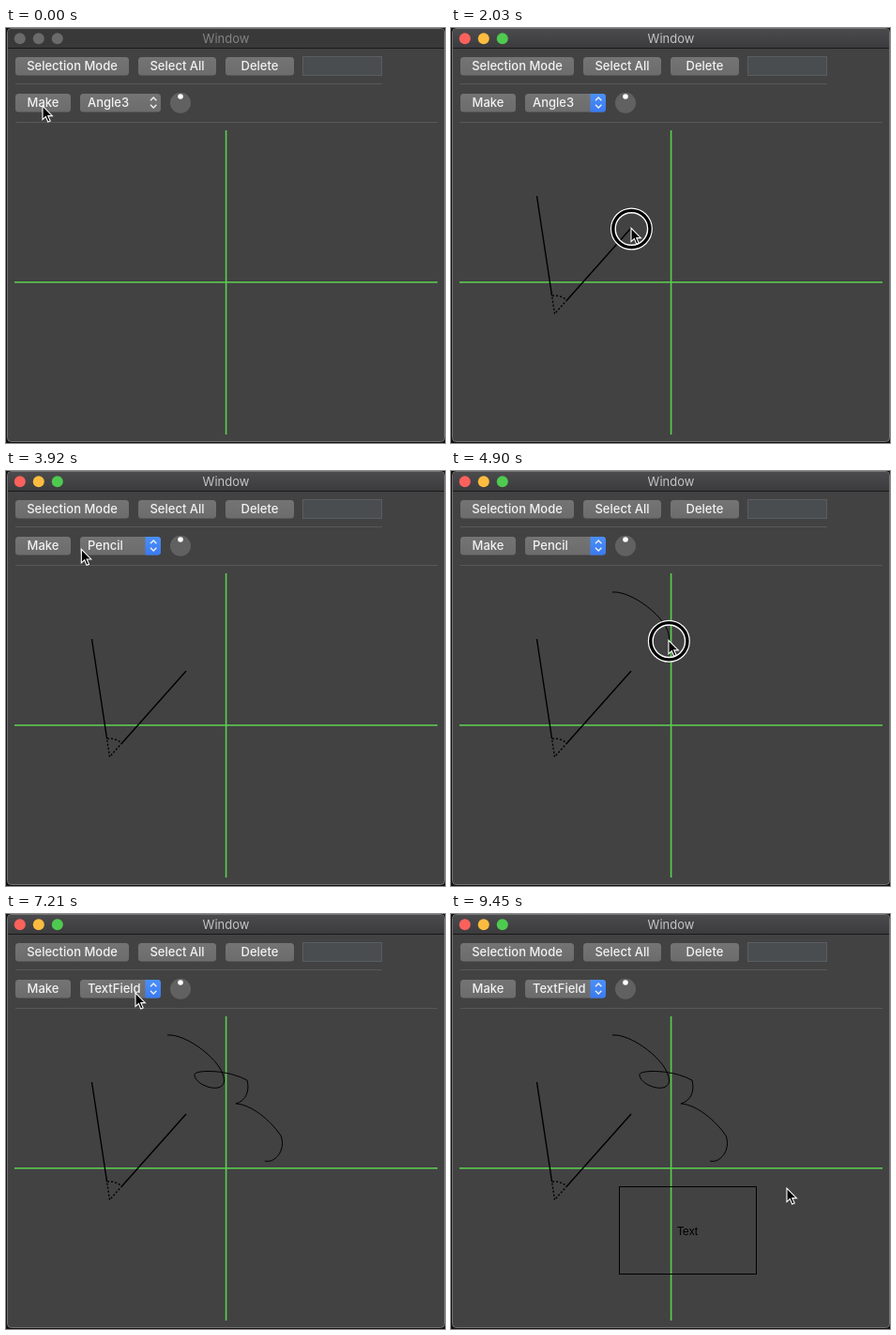
These frames come from a looping animation (468 px wide and 442 px high, 9.52 s). An HTML page:

```html
<!DOCTYPE html>
<html lang="en">
<head>
<meta charset="utf-8">
<title>Drawing window</title>
<style>
html, body { margin: 0; width: 100%; height: 100%; overflow: hidden; background: #111; }
svg { display: block; width: 468px; height: 442px; }
text { font: 500 13px Inter, "Open Sans", sans-serif; fill: #f2f2f2; }
.mid { text-anchor: middle; }
.ink { fill: none; stroke: #000; stroke-width: 1.4; }
.thin { stroke-width: 1; }
.dots { stroke-dasharray: 2 2; }
.rule { stroke: #58585a; }
.axis { stroke: #5bd04e; stroke-width: 1.6; }
</style>
</head>
<body>
<svg viewBox="0 0 468 442">
  <defs>
    <linearGradient id="bar" x2="0" y2="1"><stop stop-color="#4b4b4d"/><stop offset="1" stop-color="#3b3b3d"/></linearGradient>
    <linearGradient id="face" x2="0" y2="1"><stop stop-color="#747475"/><stop offset="1" stop-color="#6c6c6d"/></linearGradient>
    <linearGradient id="blue" x2="0" y2="1"><stop stop-color="#4b90f9"/><stop offset="1" stop-color="#3a7af1"/></linearGradient>
  </defs>
  <rect x="1.5" y=".5" width="466" height="440" rx="4" fill="#424243" stroke="#737374"/>
  <path id="titlebar" d="M2 21.5V5Q2 1 6 1H463Q467 1 467 5V21.5Z"/>
  <path d="M2 21.5H467" stroke="#19191a"/>
  <g id="lights"></g>
  <text id="title" class="mid" x="234.5" y="16" style="font-weight:400">Window</text>

  <g id="buttons"></g>
  <rect x="316.5" y="30.5" width="84" height="20" fill="#494d50" stroke="#5a5d60"/>
  <path class="rule" d="M10 59.5H401M10 100.5H460"/>
  <rect x="79" y="70" width="86" height="19.5" rx="3.5" fill="url(#face)"/>
  <path id="stepper" d="M148.5 70H161.5Q165 70 165 73.5V86Q165 89.5 161.5 89.5H148.5Z" fill="url(#blue)"/>
  <path d="M154 77.3L157.2 74 160.4 77.3M154 81.7L157.2 85 160.4 81.7" fill="none" stroke="#eee" stroke-width="1.4"/>
  <text id="tool" x="87" y="84"></text>
  <circle cx="186" cy="79.7" r="11" fill="#616162"/>
  <circle cx="186" cy="73" r="2.8" fill="#fff"/>

  <path class="axis" d="M234.6 109V433M9 270.8H460"/>
  <path id="arms" class="ink"/>
  <path id="wedge" class="ink dots"/>
  <path id="pencil" class="ink thin" d="M172 129C192 127 232 157 232.5 177C232.5 193 201 183 201 171C201 166 235 165 257 177C260 188 256 199 245 202C262 203 282 220 293 236C299 252 286 266 276 263"/>
  <g id="field">
    <rect id="frame" class="ink thin" x="179.5" y="290.5"/>
    <text id="label" class="mid" style="font:12px 'Liberation Sans',Arial,sans-serif;fill:#000">Text</text>
  </g>

  <g id="cursor">
    <g id="ring" fill="none" transform="translate(.4 1)">
      <circle r="19.5" stroke="#fff" stroke-width="6"/>
      <circle r="19.6" stroke="#000" stroke-width="3.4"/>
    </g>
    <path d="M0 0V14.5L3.4 11.4 5.7 17 8.2 16 5.8 10.6H10.4Z" stroke="#fff" stroke-width="1.1"/>
  </g>
</svg>
<script>
const LOOP = 9520, STEP = 70, CLICK = 280;
const $ = id => document.getElementById(id);
const set = (id, attrs) => { for (const k in attrs) $(id).setAttribute(k, attrs[k]); };
const show = (id, on) => { $(id).style.display = on ? '' : 'none'; };
const clamp = u => Math.min(1, Math.max(0, u));
const ease = u => u * u * (3 - 2 * u);

// The cursor arrives at a place, stays there, then glides to the next one.
const stops = [];
function visit(at, [x, y], stay = CLICK) {
  const stop = { at, x, y, leave: at + stay, press: at + STEP, release: at + Math.min(stay, CLICK) };
  stops.push(stop);
  return stop;
}
const makeButton = [49, 83], menu = [138, 84];
const makeAngle = visit(0, [39, 83]);
const vertex = visit(420, [110.5, 304.5]);
const endA = visit(840, [91.5, 179], 350);
const endB = visit(1890, [192, 213]);
const pickPencil = visit(2730, menu, 980);
const makePencil = visit(4060, makeButton);
const draw = visit(4620, [172, 129], 1050);
const pickField = visit(6510, menu, 700);
const makeField = visit(7700, makeButton);
const cornerA = visit(8400, [179, 290]);
const cornerB = visit(9030, [325, 383], 140);
visit(9450, [358, 292], 0);
draw.release = draw.leave - STEP;

const pressed = (stop, t) => t >= stop.press && t < stop.release;
const pencilLength = $('pencil').getTotalLength();
const drawnLength = t => pencilLength * clamp((t - draw.press) / (11 * STEP));

function buildControls() {
  const button = (name, x, y, w) =>
    `<rect id="${name}" x="${x}" y="${y}" width="${w}" height="19.5" rx="3.5" fill="url(#face)"/>
     <text class="mid" x="${x + w / 2}" y="${y + 14}">${name}</text>`;
  $('buttons').innerHTML = button('Selection Mode', 10, 31, 121) + button('Select All', 141, 31, 83)
    + button('Delete', 234, 31, 73) + button('Make', 10, 70, 59);
  $('lights').innerHTML = [0, 1, 2].map(i => `<circle cx="${14.8 + 20 * i}" cy="11.2" r="6"/>`).join('');
}

function placeAt(stop, t) {
  return stop === draw ? $('pencil').getPointAtLength(drawnLength(t)) : stop;
}

function cursorAt(t) {
  const i = stops.findLastIndex(stop => stop.at <= t);
  const next = stops[i + 1], from = placeAt(stops[i], t);
  if (!next) return [from.x, from.y];
  const e = ease(clamp((t - stops[i].leave) / (next.at - stops[i].leave)));
  return [from.x + (next.x - from.x) * e, from.y + (next.y - from.y) * e];
}

function alongArm([x, y], distance) {
  const dx = x - vertex.x, dy = y - vertex.y, k = distance / Math.hypot(dx, dy);
  return [vertex.x + dx * k, vertex.y + dy * k];
}

function drawAngle(t, tip) {
  const first = t < endA.at ? tip : [endA.x, endA.y];
  const second = t < endB.at ? tip : [endB.x, endB.y];
  const corner = [vertex.x, vertex.y], open = t > endA.leave;
  show('arms', t > vertex.leave);
  show('wedge', open);
  if (!open) return set('arms', { d: `M${corner}L${first}` });
  const a = alongArm(first, 19.5), b = alongArm(second, 19.5);
  set('arms', { d: `M${first}L${a}M${second}L${b}` });
  set('wedge', { d: `M${corner}L${a}A19.5 19.5 0 0 1 ${b}L${corner}` });
}

function drawField(t, tip) {
  show('field', t > cornerA.leave);
  const [x, y] = t < cornerB.at ? tip : [cornerB.x, cornerB.y];
  const width = Math.max(0, x - cornerA.x), height = Math.max(0, y - cornerA.y);
  set('frame', { width, height });
  set('label', { x: cornerA.x + width / 2, y: cornerA.y + height / 2 + 5.5 });
}

function drawChrome(t) {
  const active = t >= makeAngle.press;
  const making = [makeAngle, makePencil, makeField].some(stop => pressed(stop, t));
  ['#fc615c', '#fdbc40', '#4fca50'].forEach((color, i) =>
    $('lights').children[i].setAttribute('fill', active ? color : '#6a6a6b'));
  set('titlebar', { fill: active ? 'url(#bar)' : '#39393a' });
  $('title').style.fill = active ? '#c4c4c5' : '#838384';
  show('stepper', active);
  set('Make', { fill: making ? 'url(#blue)' : 'url(#face)' });
  $('tool').textContent = t < pickPencil.leave ? 'Angle3' : t < pickField.leave ? 'Pencil' : 'TextField';
}

function render(t) {
  const tip = cursorAt(t), drawn = drawnLength(t);
  drawChrome(t);
  drawAngle(t, tip);
  show('pencil', drawn > 0);
  set('pencil', { 'stroke-dasharray': `${drawn} ${pencilLength + 1}` });
  drawField(t, tip);
  show('ring', stops.some(stop => pressed(stop, t)));
  set('cursor', { transform: `translate(${tip})` });
}

buildControls();
const start = performance.now();
function tick() {
  const t = (performance.now() - start) % LOOP;
  render(Math.floor(Math.max(0, t) / STEP) * STEP);
  requestAnimationFrame(tick);
}
tick();
</script>
</body>
</html>
```
